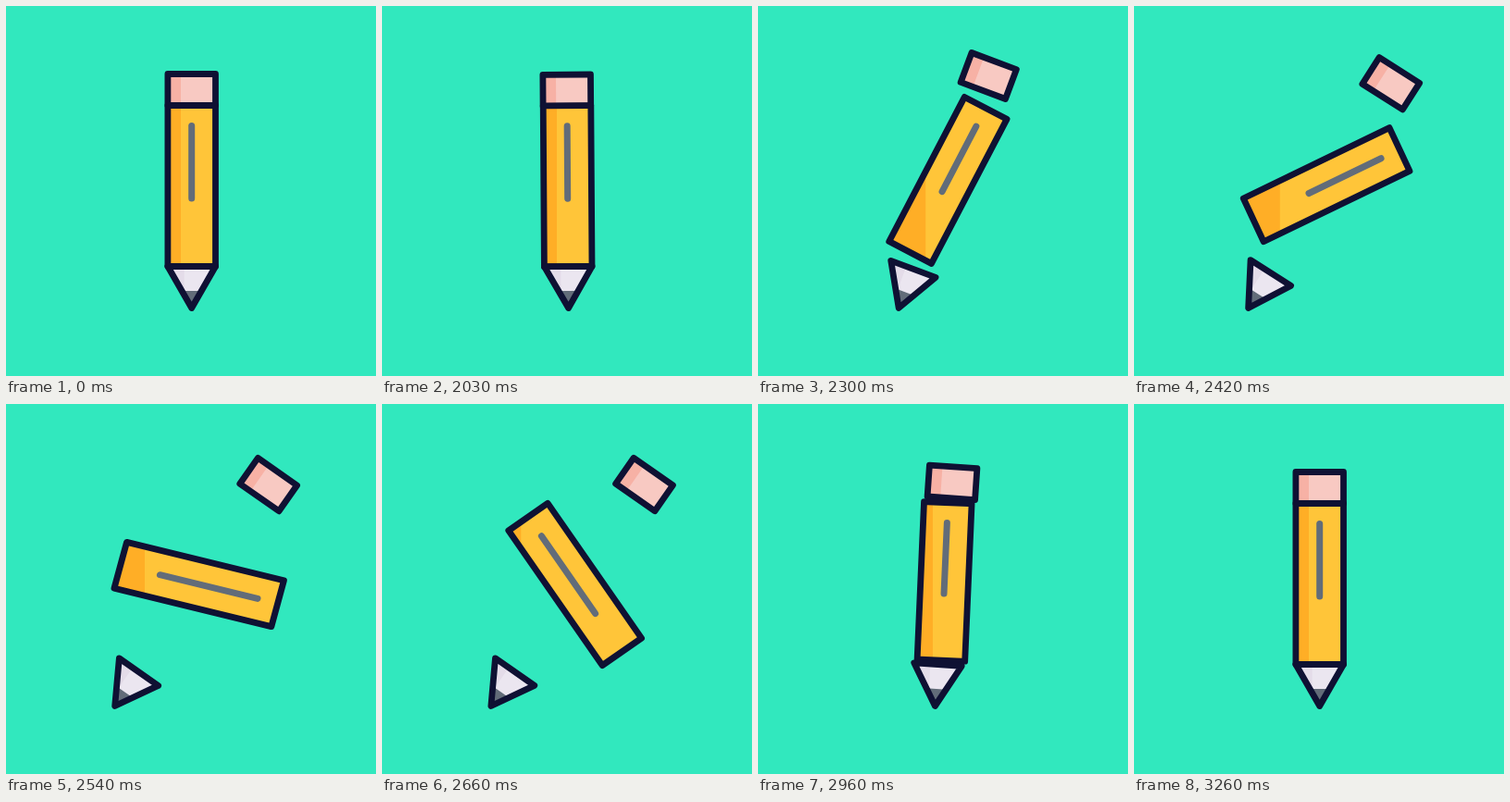
These frames come from a looping animation (400x400 px, 3.29 s). An HTML page with a canvas:

```html
<!DOCTYPE html>
<html lang="en">
<head>
<meta charset="utf-8">
<title>Pencil</title>
<style>
  html, body { margin: 0; width: 100%; height: 100%; overflow: hidden; background: #31e8be; }
  canvas { display: block; width: 400px; height: 400px; }
</style>
</head>
<body>
<canvas id="stage"></canvas>
<script>
const LOOP = 3290, START = 2030, STEP = 30;
const INK = '#0f1133', GREY = '#626c79';
const canvas = document.getElementById('stage');
const ctx = canvas.getContext('2d');
const ratio = window.devicePixelRatio || 1;
canvas.width = canvas.height = 400 * ratio;

// Smooth curve through [time, value] keys.
function curve(keys) {
  const slope = i => {
    const a = keys[Math.max(i - 1, 0)], b = keys[Math.min(i + 1, keys.length - 1)];
    return i === 0 || i === keys.length - 1 ? 0 : (b[1] - a[1]) / (b[0] - a[0]);
  };
  return t => {
    if (t <= keys[0][0]) return keys[0][1];
    const i = keys.findIndex(k => k[0] > t) - 1;
    if (i < 0) return keys[keys.length - 1][1];
    const [t0, v0] = keys[i], [t1, v1] = keys[i + 1];
    const d = t1 - t0, u = (t - t0) / d, w = 1 - u;
    return v0 * w * w * (1 + 2 * u) + v1 * u * u * (3 - 2 * u)
      + d * u * w * (slope(i) * w - slope(i + 1) * u);
  };
}

const swing = curve([[2000, 0], [2030, -0.011], [2100, -0.04], [2170, 0.05], [2230, 0.25],
  [2300, 0.585], [2370, 0.84], [2450, 0.96], [2540, 1], [2590, 1.01], [2690, 0.985],
  [2780, 0.905], [2870, 0.54], [2960, 0.112], [3005, -0.02], [3060, -0.072],
  [3110, -0.065], [3180, -0.027], [3260, 0]]);
const stretch = curve([[2030, 1], [2300, 1.012], [2540, 1.005], [2780, 1.03], [2960, 0.98], [3200, 1]]);
const skew = curve([[2300, 0], [2540, 1.5], [2660, 0], [2780, -2.1], [2960, 0]]);

const rad = deg => deg * Math.PI / 180;
function sine(t, from, to) {
  const p = Math.min(1, Math.max(0, (t - from) / (to - from)));
  return (1 - Math.cos(Math.PI * p)) / 2;
}

function place(x, y, angle) {
  ctx.translate(x, y);
  ctx.rotate(rad(angle));
}

function trace(points) {
  ctx.beginPath();
  points.forEach(([x, y]) => ctx.lineTo(x, y));
  ctx.closePath();
}

const box = (w, h) => [[-w, -h], [w, -h], [w, h], [-w, h]];

function outline(points) {
  trace(points);
  ctx.strokeStyle = INK;
  ctx.lineWidth = 6.8;
  ctx.stroke();
}

// Fills a shape, then paints its inner details clipped to it.
function fillShape(points, color, details) {
  ctx.save();
  trace(points);
  ctx.fillStyle = color;
  ctx.fill();
  ctx.clip();
  details();
  ctx.restore();
}

function patch(color, x, y, w, h) {
  ctx.fillStyle = color;
  ctx.fillRect(x, y, w, h);
}

function resetView() {
  ctx.setTransform(ratio, 0, 0, ratio, 0, 0);
}

function eraser(e) {
  const shape = box(25.8, 17);
  ctx.save();
  place(200.7 + 83 * e, 90.5 - 57 * e + 53.6 * e * e, 35 * e);
  fillShape(shape, '#f8c9c2', () => patch('#f7b1a5', -30, -20, 18.3, 40));
  outline(shape);
  ctx.restore();
}

function barrel(t, e) {
  const shape = box(25.8, 87);
  const head = 13.5 + 51.5 * sine(t, 2320, 2720);
  const tail = -65 + 51.5 * sine(t, 2530, 2780);
  const k = rad(skew(t));
  ctx.save();
  place(200.7 + 8 * e, 194.5 - 25.7 * e + 26.2 * e * e, 35 * e + 180 * sine(t, 2197, 3006));
  ctx.transform(Math.cos(k), Math.sin(k), 0, stretch(t), 0, 0);
  // The shade keeps an upright edge while the barrel turns.
  fillShape(shape, '#ffc539', () => {
    resetView();
    patch('#ffae26', 0, 0, 189 - 39 * e ** 3, 400);
  });
  ctx.beginPath();
  ctx.moveTo(0, tail);
  ctx.lineTo(0, head);
  ctx.strokeStyle = GREY;
  ctx.lineWidth = 7;
  ctx.stroke();
  outline(shape);
  ctx.restore();
}

function tip(e) {
  const shape = [[-25.8, -45], [25.8, -45], [0, 0]];
  ctx.save();
  place(200.7 - 83 * e, 326.5, 35 * e);
  fillShape(shape, '#ebe6f0', () => {
    patch('#e4dce9', -30, -50, 22, 50);
    patch(GREY, -30, -18.5, 60, 20);
  });
  outline(shape);
  ctx.restore();
}

function draw(now) {
  const time = now % LOOP;
  const t = time < START ? 0 : START + Math.floor((time - START) / STEP) * STEP;
  const e = swing(t);
  resetView();
  patch('#31e8be', 0, 0, 400, 400);
  ctx.lineJoin = ctx.lineCap = 'round';
  eraser(e);
  barrel(t, e);
  tip(e);
}

const origin = performance.now();
function tick() {
  draw(performance.now() - origin);
  requestAnimationFrame(tick);
}
tick();
</script>
</body>
</html>
```
